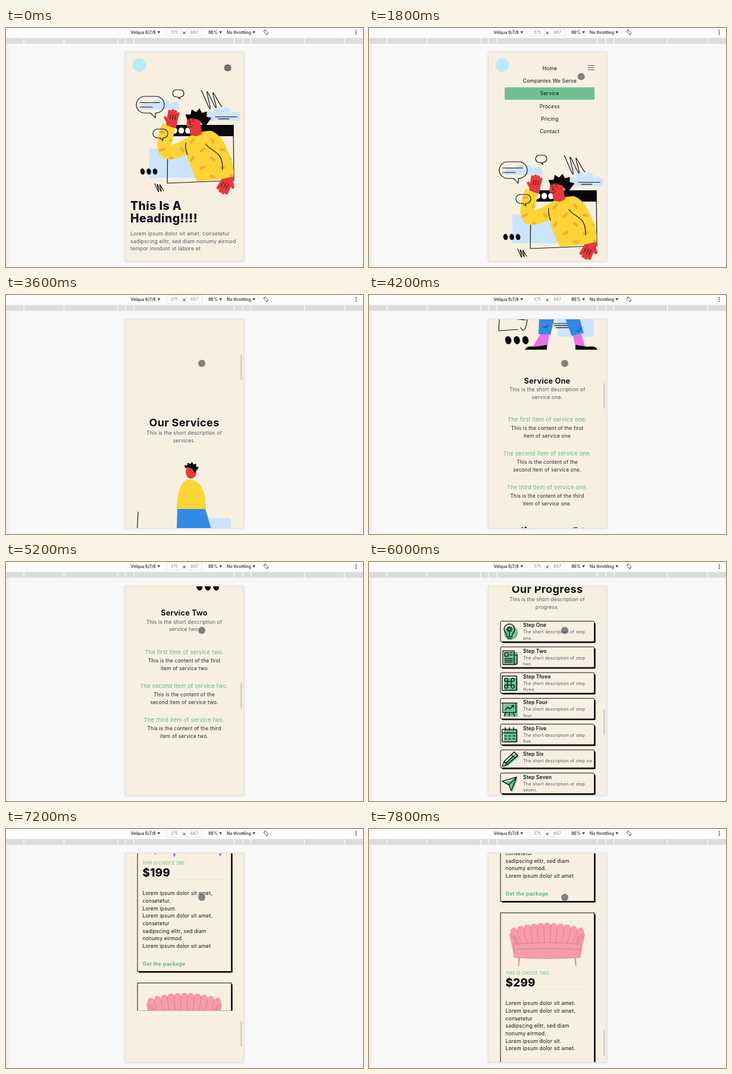
Write an HTML page that moves like this. It is 600 by 402 pixels and loops after 8000 ms.

```html
<!DOCTYPE html>
<html lang="en">
<head>
<meta charset="utf-8">
<title>Responsive page preview</title>
<style>
  html, body { margin: 0; width: 100%; height: 100%; overflow: hidden; background: #f8f8f9; }
  svg { display: block; width: 100vw; height: 100vh; }
  text { font-family: Inter, sans-serif; letter-spacing: .02em; }
  .bar text { letter-spacing: 0; }
  .line { fill: none; stroke: #111; stroke-width: 1.2; stroke-linecap: round; stroke-linejoin: round; }
  .icon { fill: none; stroke: #14221b; stroke-width: 1.5; stroke-linejoin: round; stroke-linecap: round; }
</style>
</head>
<body>
<svg id="stage" viewBox="0 0 600 402" preserveAspectRatio="none"></svg>
<script>
const CREAM = '#f7f0e1', GREEN = '#6fc192', LEAF = '#5dba85', SKY = '#cbe4fb', RED = '#e8383b';
const BLACK = '#080808', INK = '#10141f', GREY = '#555763';
const MIDDLE = 299.5, LEADING = 12.66;

// Markup helpers; text is placed by the middle of its capitals.
const repeat = (n, make, glue = '') => Array.from({ length: n }, (_, i) => make(i)).join(glue);
const text = (x, y, s, size = 8.45, fill = '#111', weight = 400, anchor = 'start') =>
  `<text x="${x}" y="${y}" dy=".36em" font-size="${size}" fill="${fill}" font-weight="${weight}" text-anchor="${anchor}">${s}</text>`;
const centered = (y, s, size, fill, weight, x = MIDDLE) => text(x, y, s, size, fill, weight, 'middle');
const rows = (x, y, list, size, fill) => list.map((s, i) => text(x, y + i * LEADING, s, size, fill)).join('');
const rect = (x, y, w, h, fill, more = '') => `<rect x="${x}" y="${y}" width="${w}" height="${h}" fill="${fill}" ${more}/>`;
const path = (d, fill, more = '') => `<path d="${d}" fill="${fill}" ${more}/>`;
const line = (d, more = '') => `<path class="line" d="${d}" ${more}/>`;
const oval = (x, y, rx, ry, fill, more = '') => `<ellipse cx="${x}" cy="${y}" rx="${rx}" ry="${ry}" fill="${fill}" ${more}/>`;
const place = (x, y, body, turn = 0, scale = 1) => `<g transform="translate(${x} ${y}) rotate(${turn}) scale(${scale})">${body}</g>`;
const card = (y, h, r = 2) => rect(223.2, y + 2.2, 157.5, h, BLACK, `rx="${r}"`) +
  rect(221, y, 157.5, h, CREAM, `rx="${r}" stroke="#111" stroke-width="1"`);
const heading = (y, title, tail) => centered(y, title, 18, '#111', 700) +
  centered(y + 17.3, 'This is the short description of', 8.45, GREY) + centered(y + 30, tail, 8.45, GREY);

function toolbar() {
  const label = (x, s) => text(x, 7.4, s, 6.9, '#222', 500);
  const arrow = x => path(`M${x} 5.5h4.4l-2.2 4z`, '#333');
  const field = (x, s) => rect(x, 1, 25.5, 12.5, '#fff', 'stroke="#e2e2e2" stroke-width=".8"') + centered(7.4, s, 7, '#888', 400, x + 12.7);
  const gap = x => rect(x - .65, 17, 1.3, 9.5, '#fafafa');
  const breakpoints = [320, 375, 425, 768, 1024];
  return '<g class="bar">' + rect(0, 0, 600, 15.5, '#fcfcfc') +
    label(209.5, 'Velqua 6/7/8') + arrow(254.5) + field(270, '375') + centered(7.6, '×', 10, '#333') + field(304, '667') +
    label(340, '86%') + arrow(358.5) + label(371, 'No throttling') + arrow(414.5) +
    place(437, 7.3, rect(-1.9, -3.3, 3.8, 6.6, 'none', 'rx=".6" stroke="#555" stroke-width=".9"'), -45) +
    [0, 180].map(a => place(437, 7.3, path('M-4-1A4.3 4.3 0 0 1 0-4.3', 'none', 'stroke="#555" stroke-width=".8"'), a)).join('') +
    repeat(3, i => oval(588.5, 4.4 + 3.1 * i, 1, 1, '#444')) +
    rect(0, 17, 600, 9.5, '#dcdcdc') + breakpoints.map(w => gap(MIDDLE - w * .263) + gap(MIDDLE + w * .263)).join('') + '</g>';
}

// Round bumps riding on a curve given by top(u), for clouds and sofa backs.
const bumps = (x, w, n, top, rise) => `M${x} ${top(0)}` +
  repeat(n, i => `A${w / n * .52} ${rise} 0 0 1 ${x + w * (i + 1) / n} ${top((i + 1) / n)}`);
const cloud = (x, y, w, h) => path(bumps(x, w, 4, u => y - h * .7 * Math.sin(Math.PI * u), w / 7) + 'z', SKY);
const drops = (x, y, step, rx, ry) => repeat(3, i => place(x + i * step, y, oval(0, 0, rx, ry, BLACK), -12));
const bubble = (x, y, w, h) => {
  const r = h / 2, tail = h * .29;
  return line(`M${x + r} ${y}H${x + w - r}a${r} ${r} 0 0 1 0 ${h}h-1v${tail}l${-tail} ${-tail}H${x + r}a${r} ${r} 0 0 1 0 ${-h}z`);
};
const scribble = (x, y, w, h, turns) => line('M' + repeat(60, i => {
  const u = i / 59, swing = Math.cos(2 * Math.PI * turns * u);
  return `${x + w * u - w * .2 * swing} ${y - h / 2 * swing * (1 - .3 * u)}`;
}, 'L'));

// An open hand pointing up from its palm.
function hand() {
  const finger = i => `M${-6.5 + i * 4.3} -3L${-7 + i * 4.9} ${-15 - 3 * Math.sin(i + .3)}`;
  return path(repeat(4, finger) + 'M-5 4L-12 -4', 'none', `stroke="${RED}" stroke-width="5" stroke-linecap="round"`) +
    rect(-9, -6, 18, 17, RED, 'rx="6"') + line(repeat(3, i => `M${-4.3 + i * 4.3} -3l.3 -8`), 'style="stroke-width:.8"');
}
const shirt = color => path('M274 165Q261 200 270 208 283 213 318 190', 'none', `stroke="${color}" stroke-width="24"`) +
  path('M301 189Q318 173 345 173 362 180 371 202 386 232 382 250L357 255 321 258Q312 238 302 212z', color);
function patches() {
  const grid = repeat(24, i => {
    const row = Math.floor(i / 4), x = 262 + i % 4 * 34 + row % 2 * 17, y = 175 + row * 15;
    return place(x, y, rect(-5, -2.1, 10, 4.2, '#f9a83b'), 60 * Math.sin(i * 2.3));
  });
  return `<mask id="shirt">${shirt('#fff')}</mask><g mask="url(#shirt)">${grid}</g>`;
}
// Spiky hair: a fan of long and short rays.
const hair = (x, y, r) => path('M' + repeat(10, i => {
  const a = (200 + i * 15.5) * Math.PI / 180, reach = i % 2 ? r : r * .75;
  return `${x + reach * Math.cos(a)} ${y + reach * Math.sin(a)}`;
}, 'L') + `L${x + r * .45} ${y + r * .3}L${x + r * .12} ${y - r * .2}L${x - r * .35} ${y - r * .35}z`, BLACK);

function hero() {
  return cloud(229, 137, 62, 16) + cloud(333, 156, 59, 24) + rect(241, 203, 118, 49, SKY) + rect(275, 163, 107.5, 19, BLACK) +
    repeat(3, i => oval(283 + i * 11.5, 172.5, 4.8, 5.2, '#fff')) + line('M272 190 271 261 383 256.5 382 163') +
    place(371, 258, hand(), 205, 1.1) + place(279, 157, hand(), 10) + shirt('#fcd535') + patches() +
    path('M305 150 326 150 329 178Q319 186 309 178V171L303 164z', RED) + hair(322, 160, 25) +
    oval(307.5, 157, .9, 1.1, '#111') + oval(315, 157, .9, 1.1, '#111') +
    line('M305 154h4M313 153h4M311 157 308 162h3M306 167q5 1 8-3', 'style="stroke-width:.9"') +
    line('M302 193q-1 11 3 20M336 195C344 209 365 205 364 238') +
    bubble(219, 115, 47, 28) + line('M225 125.5h33M225 133h21') + bubble(280, 104, 19, 12) + bubble(247, 170, 25, 15) +
    scribble(333, 121, 25, 32, 2.5) + line('M352 149.5h36M357 152.8h18') + drops(229.5, 241.5, 10.5, 3.8, 5.2) +
    scribble(252, 269, 11, 14, 2.5) +
    ['This Is A', 'Heading!!!!'].map((s, i) => text(209, 299 + i * 21, s, 19.5, INK, 800)).join('') +
    rows(209, 346, ['Lorem ipsum dolor sit amet, consetetur', 'sadipscing elitr, sed diam nonumy eirmod', 'tempor invidunt ut labore et'], 8.7, GREY) +
    rect(211.7, 397.7, 100.5, 24.5, BLACK, 'rx="2"') + rect(209.5, 395.5, 100.5, 24.5, GREEN, 'rx="2" stroke="#111"') +
    centered(408, 'Learn More', 8.6, '#fff', 400, 259.8);
}

function service(y, name) {
  const title = name[0].toUpperCase() + name.slice(1), of = `item of service ${name}`;
  const items = {
    first: ['This is the content of the first', of],
    second: ['This is the content of the', `second ${of}.`],
    third: ['This is the content of the third', `${of}.`]
  };
  return centered(y, 'Service ' + title, 12.6, '#111', 700) +
    centered(y + 15, 'This is the short description of', 8.5, GREY) + centered(y + 27.5, `service ${name}.`, 8.5, GREY) +
    Object.entries(items).map(([rank, lines], i) => {
      const top = y + 66 + i * 57;
      return centered(top, `The ${rank} ${of}.`, 9.4, LEAF) + lines.map((s, k) => centered(top + 14.3 + k * LEADING, s, 8.4, '#20222c')).join('');
    }).join('');
}
function services() {
  const shoe = 'M0 0Q3-7 17-5L37-8V0z';
  const walker = rect(317, -10, 61, 80, SKY) + line('M222-20 218 60 250 58M243 40l20 2M255 55q7 14 11-14') +
    line(repeat(3, i => `M${308 + i * 3} ${48 + i * 3.4}h26`)) +
    path('M288-25H335L361 64 341 69 318 10 305 67 285 66z', '#318ae3') + path('M287-25Q288-75 310-75 336-70 336-25z', '#fcd535') +
    oval(311, -87, 9, 11, RED) + hair(311, -90, 14) +
    line('M293 54q5 2 8-3M348 61q6 1 8-6', 'style="stroke:#1762ad;stroke-width:2"') +
    path('M288 66h15l-3 21h-25zM343 68 357 65 363 87H347z', '#ee70e8') +
    place(262, 92, path(shoe, BLACK)) + `<g transform="translate(384 92) scale(-1 1)">${path(shoe, BLACK)}</g>` + drops(234, 76, 14.5, 5.2, 6.8);
  const sitter = rect(275, 410, 85, 62, SKY) + line('M340 394q8-6 12 0t8-2M232 420h28v34') +
    oval(262, 404, 8, 9, RED) + hair(262, 402, 13) + path('M250 416h26l22 26-8 40h-40z', '#ee70e8') + drops(325, 486, 14, 5, 6.5);
  return heading(680, 'Our Services', 'services.') + place(0, 850, walker + service(144, 'one') + sitter + service(530, 'two'));
}

const box = (x, y, w, h) => `M${x} ${y}h${w}v${h}h${-w}z`;
const ring = (x, y, r) => `M${x - r} ${y}a${r} ${r} 0 1 0 ${2 * r} 0a${r} ${r} 0 1 0 ${-2 * r} 0`;
const dashes = (n, x, y, dy, w) => repeat(n, i => `M${x} ${y + i * dy}h${w}`);
const bulb = 'M-4 9C-4 2-9 1-9-4A9 9 0 0 1 9-4C9 1 4 2 4 9zM-3 12h6M0 8V1' + ring(0, -4, 2.6) +
  repeat(8, i => { const c = Math.cos(i * Math.PI / 4), s = Math.sin(i * Math.PI / 4); return `M${3 * c} ${3 * s - 4}L${4.6 * c} ${4.6 * s - 4}`; });
const corners = [[-1, -1], [1, -1], [1, 1], [-1, 1]];
const command = box(-12, -12, 24, 24) + box(-3, -3, 6, 6) + corners.map(([x, y]) => ring(x * 5.7, y * 5.7, 2.7)).join('');
const page = box(-11, -11, 19, 23) + 'M8-4h5V9q-1 3-5 3' + box(-8, -8, 6, 6) + dashes(2, 1, -8, 4, 4) + dashes(3, -8, 2, 3, 13);
const board = box(-11, -10, 22, 16) + 'M-13-10h26M-6 6l-3 6M6 6l3 6M0 6v5M-7 2l4-5 4 3 6-6h-3m3 0v3';
const calendar = box(-12, -9, 24, 21) + 'M-12-3h24' + repeat(3, i => `M${-7 + i * 7}-12v5` + dashes(2, -8 + i * 7, 2, 5, 3));
const pencil = 'M-12 12-9 4 8-12l6 6L-4 9zM-9 4l5 5M3-8l6 6M-6 7 6-5';
const plane = 'M-12-4 12-11 3 12-1 2zM-1 2 12-11';
const steps = { One: bulb, Two: page, Three: command, Four: board, Five: calendar, Six: pencil, Seven: plane };

function progress() {
  const say = 'The short description of step';
  let y = 1749.5;
  return heading(1696, 'Our Progress', 'progress.') + Object.entries(steps).map(([name, icon]) => {
    const oneLine = name === 'Six', height = oneLine ? 30.2 : 34.5, tail = name.toLowerCase() + '.';
    const backdrop = /^(Six|Seven)$/.test(name) ? path(icon, GREEN) : rect(-9, -9, 23, 22, GREEN, `rx="${name === 'One' ? 10 : 2}"`);
    const body = card(y, height) + place(236, y + height / 2 + .5, (backdrop.startsWith('<path') ? place(2, 2, backdrop) : backdrop) + `<path class="icon" d="${icon}"/>`) +
      text(259, y + 6.8, 'Step ' + name, 8.5, '#111', 600) + text(259, y + 18.2, oneLine ? `${say} ${tail}` : say, 7.3, GREY) +
      (oneLine ? '' : text(259, y + 28.5, tail, 7.3, GREY));
    y += height + 8.8;
    return body;
  }).join('');
}

function pinkSofa() {
  const n = 11, x = 238, w = 123, back = u => 21 + 12 * (2 * u - 1) ** 2;
  const edge = 'stroke="#d77887" stroke-width=".8"';
  const seam = i => { const u = (i + 1) / n, sx = x + w * u; return `M${sx} ${back(u)}Q${sx} 36 ${MIDDLE + (sx - MIDDLE) * .84} 51`; };
  const mirrored = body => body + `<g transform="translate(${2 * MIDDLE} 0) scale(-1 1)">${body}</g>`;
  return mirrored(path('M254 76 252 90H250.5L251 76z', '#d5a06f')) + path(bumps(x, w, n, back, 6.2) + 'L363 36 356 70H243L236 36z', '#f69ba9') +
    path(repeat(n - 1, seam), 'none', edge) + path('M243 53Q299 47 356 53L355 75Q299 79 244 75z', '#f69ba9', edge) + path('M243 62Q299 58 356 62', 'none', edge) +
    mirrored(path(repeat(3, i => `M238 ${36 + i * 4}Q${250 - i * 2} 37 ${251 - i * 3} 53`), 'none', edge));
}
const purpleChair = () => oval(251, 82, 1.6, 5, '#9383ec') + oval(283, 83, 2, 8, '#9383ec') + oval(360, 82, 2, 8, '#9383ec') +
  rect(250, 14, 100, 50, '#a798f3', 'rx="16"') + rect(246, 46, 115, 27, '#9383ec', 'rx="8"');

function offer(y, name, price, art, lines) {
  return place(0, y, card(0, 283.5, 0) + art + text(229.5, 102, `THIS IS CHOICE ${name}`, 6.9, LEAF) +
    text(229.5, 117, price, 18.6, BLACK, 800) + line('M230 128.5H368', 'style="stroke:#e3ded2;stroke-width:.7"') +
    rows(229.5, 152.2, lines, 8.6) + text(229.5, 270.5, 'Get the package', 8.7, LEAF, 700));
}
function pricing() {
  const sit = 'Lorem ipsum dolor sit amet', mid = ['consetetur', 'sadipscing elitr, sed diam', 'nonumy eirmod.'];
  return heading(2153, 'Our Pricing', 'pricing.') +
    offer(2206, 'ONE', '$199', purpleChair(), [sit + ',', 'consetetur.', 'Lorem ipsum.', sit + ',', ...mid, sit]) +
    offer(2509, 'TWO.', '$299', pinkSofa(), [sit + '.', sit + ',', ...mid, 'Lorem ipsum dolor sit.', sit + '.']);
}

const menuItems = ['Home', 'Companies We Serve', 'Service', 'Process', 'Pricing', 'Contact'];
const MENU_TOP = 57.5, ROW = 21.1, MENU_HEIGHT = 110;

document.getElementById('stage').innerHTML = `
  <defs>
    <clipPath id="screen"><rect x="201" y="41" width="198" height="351"/></clipPath>
    <clipPath id="painted"><rect id="paintedArea" x="201" y="0" width="198" height="3000"/></clipPath>
    <linearGradient id="edge"><stop stop-color="#e9e9ea"/><stop offset="1" stop-color="#f8f8f9"/></linearGradient>
    <filter id="soft" x="-10%" y="-10%" width="120%" height="120%"><feGaussianBlur stdDeviation="2"/></filter>
  </defs>
  ${rect(0, 0, 600, 402, '#f8f8f9')}${rect(0, 27, 7, 375, 'url(#edge)')}${toolbar()}
  ${rect(200, 41, 200, 352, '#ddd', 'filter="url(#soft)"')}${rect(200.5, 40.5, 198.5, 352, CREAM, 'stroke="#e2dccf" stroke-width=".7"')}
  <g clip-path="url(#screen)">
    <g id="page"><g clip-path="url(#painted)">
      ${oval(224, 62.5, 11.5, 11.5, '#b9ebfb')}
      ${line(dashes(3, 368, 63.2, 3.5, 10), 'style="stroke:#55534f;stroke-width:1"')}
      <g id="menu">${rect(228, 0, 151, 21, GREEN, 'id="hover" rx="2"')}
        ${menuItems.map((s, i) => centered(68.2 + i * ROW, s, 8.6, '#111', 400, 303.7)).join('')}</g>
      <g id="content">${hero()}${services()}${progress()}${pricing()}</g>
    </g></g>
    ${rect(394.3, 0, 2, 43, '#c9c5bc', 'id="thumb" rx="1"')}
  </g>
  ${oval(0, 0, 6, 6, '#46464b', 'id="pointer" fill-opacity=".65"')}`;

const parts = Object.fromEntries(['page', 'menu', 'hover', 'content', 'thumb', 'pointer', 'paintedArea']
  .map(id => [id, document.getElementById(id)]));
const set = (id, name, value) => parts[id].setAttribute(name, value);

const progressOf = (t, from, to) => Math.max(0, Math.min(1, (t - from) / (to - from)));
const ease = x => x * x * (3 - 2 * x);
const mix = (a, b, k) => a.map((v, i) => v + (b[i] - v) * k);

// Each flick carries the page on to its next resting place.
const flicks = [[2600, 3000, 80.5], [3000, 4200, 769.5], [4200, 6000, 800], [6000, 7200, 600], [7200, 7800, 118]];
const scrollAt = t => flicks.reduce((sum, [from, to, distance]) => sum + distance * progressOf(t, from, to), 0);

// Pointer: down from the button to the list, back to the button, then to rest.
const BUTTON = [372.5, 67], LIST = [303.5, 131], REST = [329, 115];
function pointerAt(t) {
  const overList = progressOf(t, 400, 1100) - progressOf(t, 1400, 1920);
  return mix(mix(BUTTON, LIST, overList), REST, ease(progressOf(t, 2200, 2600)));
}

function draw(t) {
  const scroll = scrollAt(t);
  const open = ease(progressOf(t, 100, 600)) - ease(progressOf(t, 1900, 2400));
  // The highlight trails the pointer by one step.
  const [hx, hy] = pointerAt(t - STEP);
  const row = Math.floor((hy - MENU_TOP) / ROW);

  set('page', 'transform', `translate(0 ${-scroll})`);
  set('content', 'transform', `translate(0 ${MENU_HEIGHT * open})`);
  set('menu', 'opacity', open);
  set('hover', 'y', MENU_TOP + row * ROW);
  set('hover', 'opacity', hx < 350 && open > .5 ? 1 : 0);
  set('thumb', 'y', 42 + scroll / 8);
  set('thumb', 'opacity', scroll > 0 ? 1 : 0);
  set('pointer', 'transform', `translate(${pointerAt(t).join(' ')})`);
  // The browser paints the last stretch of the page late.
  set('paintedArea', 'height', t < 7400 ? 2555.5 : 3000);
}

const LOOP = 8000, STEP = 200, start = performance.now();
function tick() {
  const t = (performance.now() - start) % LOOP;
  draw(Math.floor(t / STEP) * STEP);
  requestAnimationFrame(tick);
}
tick();
</script>
</body>
</html>
```
